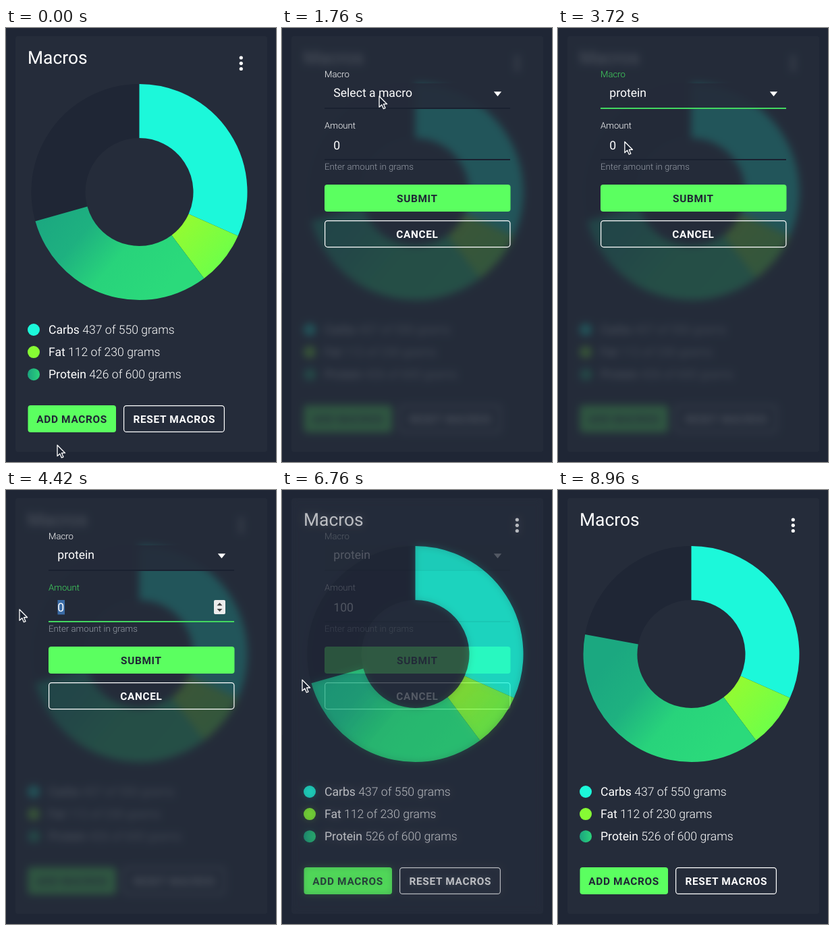
Animation, 400 px wide and 643 px high, one loop 9020 ms. Source, as an HTML page:

```html
<!DOCTYPE html>
<html lang="en">
<head>
<meta charset="utf-8">
<title>Macros</title>
<style>
  html, body { margin: 0; width: 100%; height: 100%; overflow: hidden; background: #1f2635; }
  #stage { position: relative; width: 400px; height: 643px; overflow: hidden; }
  svg { position: absolute; left: 0; top: 0; display: block; }
  text { font: 300 17.6px Roboto, sans-serif; fill: #fff; text-rendering: geometricPrecision; white-space: pre; }
  .title { font-size: 26.4px; font-weight: 400; }
  .name, .value { font-weight: 400; }
  .small { font-size: 13.2px; }
  .help { fill: #959ba5; }
  .button { font-size: 15.4px; font-weight: 700; letter-spacing: .68px; text-anchor: middle; }
  .dark { fill: #1f2635; }
  .item { font: 400 16.5px Inter, sans-serif; }
  .solid { fill: #5bff60; }
  .outline { fill: none; stroke: #fff; stroke-width: 1.2; }
  .ring path { fill: none; stroke-width: 80; }
  #veil {
    position: absolute; left: 14px; top: 12px; width: 373px; height: 616px; border-radius: 4px;
    background: rgba(37, 44, 58, .8);
    backdrop-filter: blur(6px);
  }
  #veil svg { left: -14px; top: -12px; }
</style>
</head>
<body>
<div id="stage">
  <svg width="400" height="643">
    <defs>
      <linearGradient id="fatFill" gradientUnits="userSpaceOnUse" x1="255" y1="285" x2="320" y2="345">
        <stop offset="0" stop-color="#96fb30"/><stop offset="1" stop-color="#6fff48"/>
      </linearGradient>
      <linearGradient id="proteinFill" gradientUnits="userSpaceOnUse" x1="65" y1="265" x2="225" y2="400">
        <stop offset="0" stop-color="#1ba880"/><stop offset=".3" stop-color="#1eb180"/>
        <stop offset=".6" stop-color="#28d37b"/><stop offset="1" stop-color="#2bda7b"/>
      </linearGradient>
      <linearGradient id="proteinDot">
        <stop offset="0" stop-color="#1ba37f"/><stop offset="1" stop-color="#2bd37b"/>
      </linearGradient>
    </defs>
    <rect y="12" width="1" height="351" fill="#252c3a"/>
    <rect x="14" y="12" width="373" height="616" rx="4" fill="#252c3a"/>
    <text class="title" x="32" y="53">Macros</text>
    <g fill="#fff">
      <circle cx="348.3" cy="44" r="2.6"/><circle cx="348.3" cy="52.3" r="2.6"/><circle cx="348.3" cy="60.5" r="2.6"/>
    </g>
    <g class="ring" id="ring"></g>
    <g id="legend"></g>
    <rect class="solid" x="32.5" y="559" width="130.5" height="40" rx="4"/>
    <text class="button dark" x="97.6" y="584.5">ADD MACROS</text>
    <rect class="outline" x="174.6" y="559.6" width="148.8" height="38.8" rx="4"/>
    <text class="button" x="249.3" y="584.5">RESET MACROS</text>
  </svg>

  <div id="veil">
    <svg width="400" height="643">
      <rect x="63" y="82" width="275" height="37" fill="#252c3a" opacity=".9"/>
      <text class="small" id="macroLabel" x="63" y="73">Macro</text>
      <text class="value" id="macroValue" x="76.3" y="102.3"></text>
      <path d="M313.8 94.3h11.4l-5.7 7z" fill="#fff"/>
      <rect id="macroLine" x="63" y="118" width="275" height="2"/>
      <text class="small" id="amountLabel" x="63" y="149">Amount</text>
      <rect id="selection" x="76.5" y="163" width="10.5" height="21.5" fill="#3a6ba5"/>
      <text class="value" id="amountValue" x="76.3" y="180"></text>
      <rect id="caret" x="106.8" y="164" width="1.2" height="20" fill="#fff"/>
      <g id="spinner">
        <rect x="308" y="163" width="17" height="21" rx="2" fill="#ececec"/>
        <path d="M312.5 171.3h8l-4-4.4zM312.5 175.9h8l-4 4.4z" fill="#444"/>
      </g>
      <rect id="amountLine" x="63" y="194" width="275" height="2"/>
      <text class="small help" x="63" y="210">Enter amount in grams</text>
      <rect class="solid" x="63" y="232" width="275.5" height="40" rx="4"/>
      <text class="button dark" x="200.4" y="257.5">SUBMIT</text>
      <rect class="outline" x="63.6" y="285.6" width="274.3" height="39" rx="4"/>
      <text class="button" x="200.4" y="311">CANCEL</text>
    </svg>
  </div>

  <svg width="400" height="643">
    <g id="menu">
      <rect x="51.5" y="73.5" width="276" height="106.5" rx="5" fill="#1e2b34" fill-opacity=".97" stroke="#3b4b54"/>
      <rect id="hover" x="51.5" width="276" height="24.5" fill="#0b60cf"/>
      <path d="M58.5 90.2l3.2 4 5.8-9.4" fill="none" stroke="#fff" stroke-width="1.7"/>
    </g>
    <path id="cursor" d="M0 0V16.2L3.8 12.7 6.4 18.7 9 17.6 6.5 11.7H11.6Z" fill="#1b2230" stroke="#fff" stroke-width="1.3" stroke-linejoin="round"/>
  </svg>
</div>

<script>
const LOOP = 9020, GREEN = '#43d860', IDLE = '#1a2130';
const $ = id => document.getElementById(id);
const clamp = v => Math.min(1, Math.max(0, v));
const ramp = (t, from, to) => clamp((t - from) / (to - from));
const ease = p => p * p * (3 - 2 * p);
const show = (el, on) => { el.style.visibility = on ? 'visible' : 'hidden'; };

function add(parent, tag, attrs, text) {
  const el = document.createElementNS('http://www.w3.org/2000/svg', tag);
  for (const key in attrs) el.setAttribute(key, attrs[key]);
  if (text) el.textContent = text;
  return parent.appendChild(el);
}

// name, grams, goal, slice fill, dot fill
const MACROS = [
  ['Carbs', 437, 550, '#1cf8da', '#1cf8da'],
  ['Fat', 112, 230, 'url(#fatFill)', '#86fb34'],
  ['Protein', 426, 600, 'url(#proteinFill)', 'url(#proteinDot)'],
];
const TOTAL = MACROS.reduce((sum, m) => sum + m[2], 0);

function addSlice(start, size, stroke) {
  return add($('ring'), 'path', {
    d: 'M197.5 123a120 120 0 1 1 -.01 0', pathLength: TOTAL, stroke,
    'stroke-dasharray': `${size} ${TOTAL * 2}`, 'stroke-dashoffset': -start,
  });
}

addSlice(0, TOTAL, '#1f2635');
let used = 0, slice, amount;
MACROS.forEach(([name, grams, goal, fill, dot], i) => {
  const y = 447 + i * 33.1;
  slice = addSlice(used, grams, fill);
  used += grams;
  add($('legend'), 'circle', { cx: 41, cy: y, r: 9, fill: dot });
  const row = add($('legend'), 'text', { x: 63, y: y + 6 });
  add(row, 'tspan', { class: 'name' }, name);
  amount = add(row, 'tspan', {}, ` ${grams} of ${goal} grams`);
});

['Select a macro', 'protein', 'fat', 'carbs'].forEach((label, i) =>
  add($('menu'), 'text', { class: 'item', x: 74.5, y: 94.5 + i * 24.4 }, label));

// time, x, y
const PATH = [
  [0, 76, 618], [450, 98, 578], [850, 98, 578], [1600, 144, 101], [2350, 144, 101],
  [2850, 131, 107], [3350, 131, 107], [3800, 96, 174], [3950, 94, 175], [4350, 20, 177],
  [6540, 24, 190], [6740, 30, 281], [6800, 30, 282], [7080, -14, 290], [LOOP, -14, 290],
];

function cursorAt(t) {
  const i = Math.max(1, PATH.findIndex(p => p[0] > t));
  const [t0, x0, y0] = PATH[i - 1], [t1, x1, y1] = PATH[i];
  const p = ease(ramp(t, t0, t1));
  return [x0 + (x1 - x0) * p, y0 + (y1 - y0) * p];
}

function typed(t) {
  return t < 4800 ? '0' : t < 5000 ? '1' : t < 5200 ? '10' : '100';
}

function draw(t) {
  const [x, y] = cursorAt(t);
  $('cursor').setAttribute('transform', `translate(${x} ${y})`);
  show($('cursor'), t < 4700 || t >= 6560);

  const open = ramp(t, 760, 1140) * (1 - ramp(t, 6480, 6840));
  $('veil').style.opacity = open;
  show($('veil'), open > 0);

  const menuOpen = t >= 2100 && t < 3300;
  show($('menu'), menuOpen);
  $('hover').setAttribute('y', 77.6 + 24.4 * Math.max(0, Math.floor((y - 77.6) / 24.4)));

  const onMacro = t >= 2060 && t < 3880, onAmount = t >= 3880 && t < 6480;
  $('macroLabel').style.fill = onMacro ? GREEN : '#fff';
  $('macroLine').style.fill = onMacro ? GREEN : IDLE;
  $('amountLabel').style.fill = onAmount ? GREEN : '#fff';
  $('amountLine').style.fill = onAmount ? GREEN : IDLE;
  $('macroValue').textContent = t < 3300 ? 'Select a macro' : 'protein';

  const value = typed(t);
  $('amountValue').textContent = value;
  $('caret').setAttribute('x', 77 + 9.9 * value.length);
  show($('caret'), onAmount && t >= 4800 && (t < 5700 || t >= 6200));
  show($('selection'), t >= 4080 && t < 4800);
  show($('spinner'), onAmount);

  const grams = t < 6480 ? 426 : 526;
  amount.textContent = ` ${grams} of 600 grams`;
  const size = 426 + 100 * ease(ramp(t, 6860, 7640));
  slice.setAttribute('stroke-dasharray', `${size} ${TOTAL * 2}`);
}

const start = performance.now();
function tick() {
  draw((performance.now() - start) % LOOP);
  requestAnimationFrame(tick);
}
tick();
</script>
</body>
</html>
```
